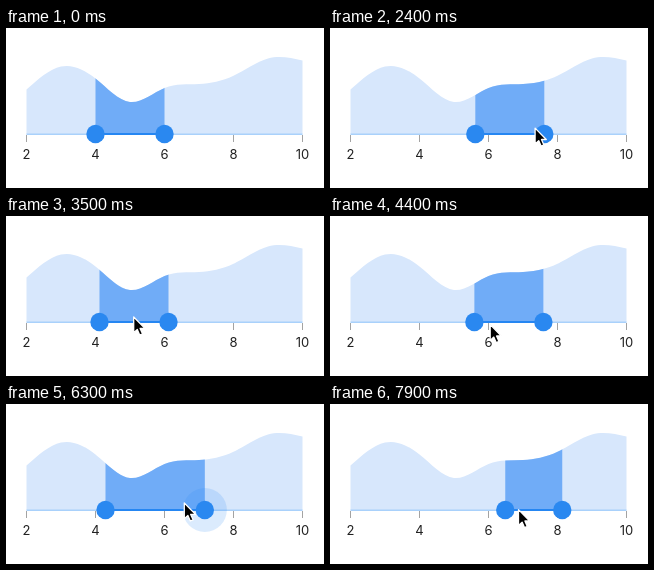
An HTML page for the animation above (8000 ms loop, 318 by 160 pixels).

```html
<!DOCTYPE html>
<html lang="en">
<head>
<meta charset="utf-8">
<title>Range slider</title>
<style>
  html, body { margin: 0; width: 100%; height: 100%; overflow: hidden; background: #fff; }
  svg { display: block; width: 318px; height: 160px; }
  text { font: 13px Inter, Roboto, sans-serif; fill: #222; text-anchor: middle; }
</style>
</head>
<body>
<svg viewBox="0 0 318 160">
  <defs>
    <clipPath id="window"><rect id="span" y="0" height="106"/></clipPath>
  </defs>
  <path class="area" fill="#d7e7fc"/>
  <path class="area" fill="#70acf7" clip-path="url(#window)"/>
  <g id="axis"></g>
  <path d="M20.5 106.2H296.5" stroke="#a9d1fb" stroke-width="1.4"/>
  <path id="track" stroke="#2586f2" stroke-width="2"/>
  <circle id="halo" cy="106" r="22" fill="#2a88f0" opacity="0.17"/>
  <circle id="left" cy="106" r="9.2" fill="#2a88f0"/>
  <circle id="right" cy="106" r="9.2" fill="#2a88f0"/>
  <path id="cursor" d="M-.8 0V15.8L2.8 12.5L5.2 18L8 16.8L5.6 11.4H10.4Z"
        stroke="#fff" stroke-width="1.3" stroke-linejoin="round"/>
</svg>
<script>
const LOOP = 8000, STEP = 100, LAG = 109;
const BASE = 106, ORIGIN = 20.5, UNIT = 34.5;
const $ = id => document.getElementById(id);
const set = (id, attrs) => {
  for (const name in attrs) $(id).setAttribute(name, attrs[name]);
};
const clamp = (v, lo, hi) => Math.min(hi, Math.max(lo, v));
const ease = u => (1 - Math.cos(Math.PI * clamp(u, 0, 1))) / 2;
const xOf = value => ORIGIN + (value - 2) * UNIT;

// Pointer strokes; each glides on from wherever the previous one ended.
const home = { x: 230, y: 80 };
const strokes = [
  { at: 800, time: 1100, x: 124.5, y: 101 },
  { at: 2000, time: 510, x: 216, y: 100 },
  { at: 2510, time: 700, x: 128.5, y: 101 },
  { at: 3610, time: 376, x: 210, y: 106 },
  { at: 3986, time: 694, x: 134.5, y: 110 },
  { at: 5050, time: 350, x: 168, y: 102 },
  { at: 5406, time: 445, x: 237, y: 99 },
  { at: 5851, time: 700, x: 156, y: 99 },
  { at: 6700, time: 350, x: 126, y: 102 },
  { at: 7180, time: 400, x: 220.5, y: 102 },
  { at: 7580, time: 400, x: 186, y: 106 }
];

function pointer(t) {
  return strokes.reduce((p, s) => {
    const u = ease((t - s.at) / s.time);
    return { x: p.x + (s.x - p.x) * u, y: p.y + (s.y - p.y) * u };
  }, home);
}

// Distance dragged so far; the slider trails the pointer by LAG.
const dragged = (t, from, to) =>
  pointer(clamp(t - LAG, from, to)).x - pointer(from).x;

// Natural cubic spline through evenly spaced heights.
function splinePath(ys) {
  const n = ys.length - 1, m = ys.map(() => 0);
  for (let pass = 0; pass < 40; pass++) {
    for (let i = 0; i <= n; i++) {
      if (i === 0) m[i] = (3 * (ys[1] - ys[0]) - m[1]) / 2;
      else if (i === n) m[i] = (3 * (ys[n] - ys[n - 1]) - m[n - 1]) / 2;
      else m[i] = (3 * (ys[i + 1] - ys[i - 1]) - m[i - 1] - m[i + 1]) / 4;
    }
  }
  let d = `M${ORIGIN} ${BASE}V${ys[0]}`;
  for (let i = 0; i < n; i++) {
    const x = ORIGIN + i * UNIT;
    d += `C${x + UNIT / 3} ${ys[i] + m[i] / 3} ${x + UNIT * 2 / 3} ${ys[i + 1] - m[i + 1] / 3}`
      + ` ${x + UNIT} ${ys[i + 1]}`;
  }
  return d + `V${BASE}Z`;
}

function buildChart() {
  const d = splinePath([61.5, 38.5, 50.5, 74, 60, 56, 47.8, 30.5, 32.5]);
  document.querySelectorAll(".area").forEach(area => area.setAttribute("d", d));
  for (let value = 2; value <= 10; value += 2) {
    const x = xOf(value);
    $("axis").innerHTML +=
      `<path d="M${x} 107V114" stroke="#a3a3a3"/><text x="${x}" y="130.6">${value}</text>`;
  }
}

function draw(t) {
  const shift = dragged(t, 2000, 4900) + dragged(t, 7100, LOOP);
  const left = xOf(4) + shift;
  const right = xOf(6) + shift + dragged(t, 5400, 6650);
  const tip = pointer(t);
  set("span", { x: left, width: right - left });
  set("track", { d: `M${left} ${BASE}H${right}` });
  set("left", { cx: left });
  set("right", { cx: right });
  set("halo", { cx: right, visibility: t >= 5400 && t < 6800 ? "visible" : "hidden" });
  set("cursor", {
    transform: `translate(${tip.x} ${tip.y})`,
    visibility: t >= 700 ? "visible" : "hidden"
  });
}

const start = performance.now();
function tick() {
  const t = (performance.now() - start) % LOOP;
  draw(Math.floor(t / STEP) * STEP);
  requestAnimationFrame(tick);
}

buildChart();
draw(0);
requestAnimationFrame(tick);
</script>
</body>
</html>
```
